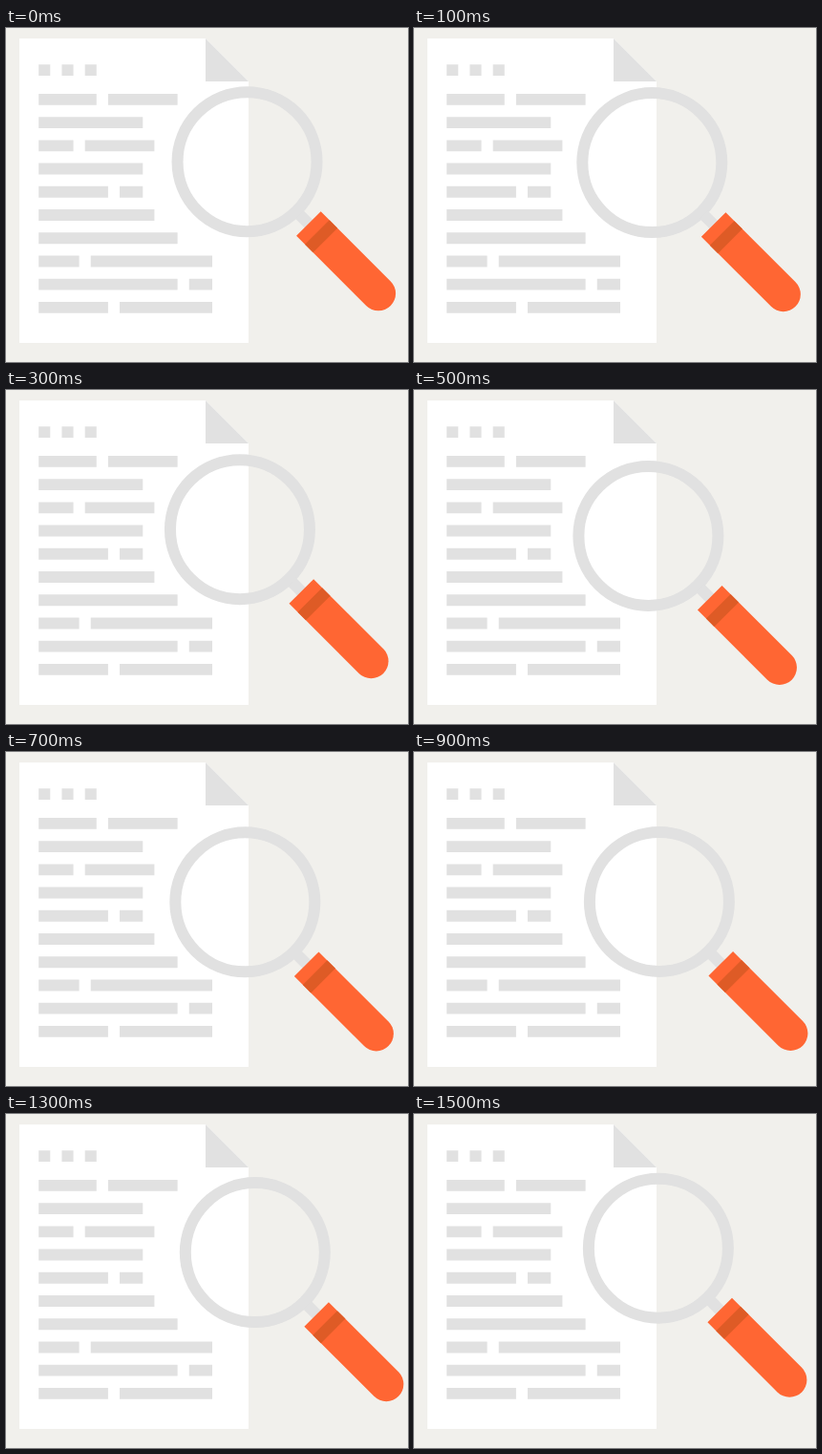
These frames come from a looping animation (421x350 px, 1600 ms). An HTML page:

```html
<!DOCTYPE html>
<html lang="en">
<head>
<meta charset="utf-8">
<title>Document search</title>
<style>
  html, body { margin: 0; width: 100%; height: 100%; overflow: hidden; background: #f1f0ec; }
  svg { display: block; width: 421px; height: 350px; }
</style>
</head>
<body>
<svg viewBox="0 0 421 350">
  <path d="M14 11H209L254 56V330H14Z" fill="#fff"/>
  <path d="M209 11V56H254Z" fill="#e1e1e1"/>
  <path id="words" fill="#e1e1e1"/>
  <g id="glass">
    <circle r="73" fill="none" stroke="#e1e1e1" stroke-width="12"/>
    <g transform="translate(0 .5) rotate(45)">
      <path d="M77 0H93" stroke="#e1e1e1" stroke-width="12"/>
      <path d="M91 -18.1H194.4a18.1 18.1 0 0 1 0 36.2H91Z" fill="#ff6633"/>
      <path d="M103.7 0h12" stroke="#de5b26" stroke-width="36.2"/>
    </g>
  </g>
</svg>
<script>
const LOOP = 1600, STEP = 100;
const UNIT = 12.12, LEFT = 34.2;
const glass = document.getElementById('glass');

// word lengths in grid units, with one unit between words
function line(text, y) {
  let x = LEFT, d = '';
  for (const n of text.split(' ')) {
    const w = n * UNIT;
    d += `M${x} ${y}h${w}v11.8h${-w}z`;
    x += w + UNIT;
  }
  return d;
}

const body = '5 6|9|3 6|9|6 2|10|12|3.5 10.5|12 2|6 8'.split('|');
document.getElementById('words').setAttribute('d',
  line('1 1 1', 38.2) + body.map((s, i) => line(s, 68.9 + 2 * UNIT * i)).join(''));

// the glass circles counter-clockwise, advancing ten times a second
function draw(ms) {
  const t = Math.floor((ms % LOOP) / STEP) * STEP;
  const a = 2 * Math.PI * t / LOOP + 0.065;
  const x = 253.1 - 8.6 * Math.sin(a);
  const y = 149 - 8.8 * Math.cos(a);
  glass.setAttribute('transform', `translate(${x.toFixed(2)} ${y.toFixed(2)})`);
}

const start = performance.now();
function tick() {
  draw(performance.now() - start);
  requestAnimationFrame(tick);
}
draw(0);
requestAnimationFrame(tick);
</script>
</body>
</html>
```
